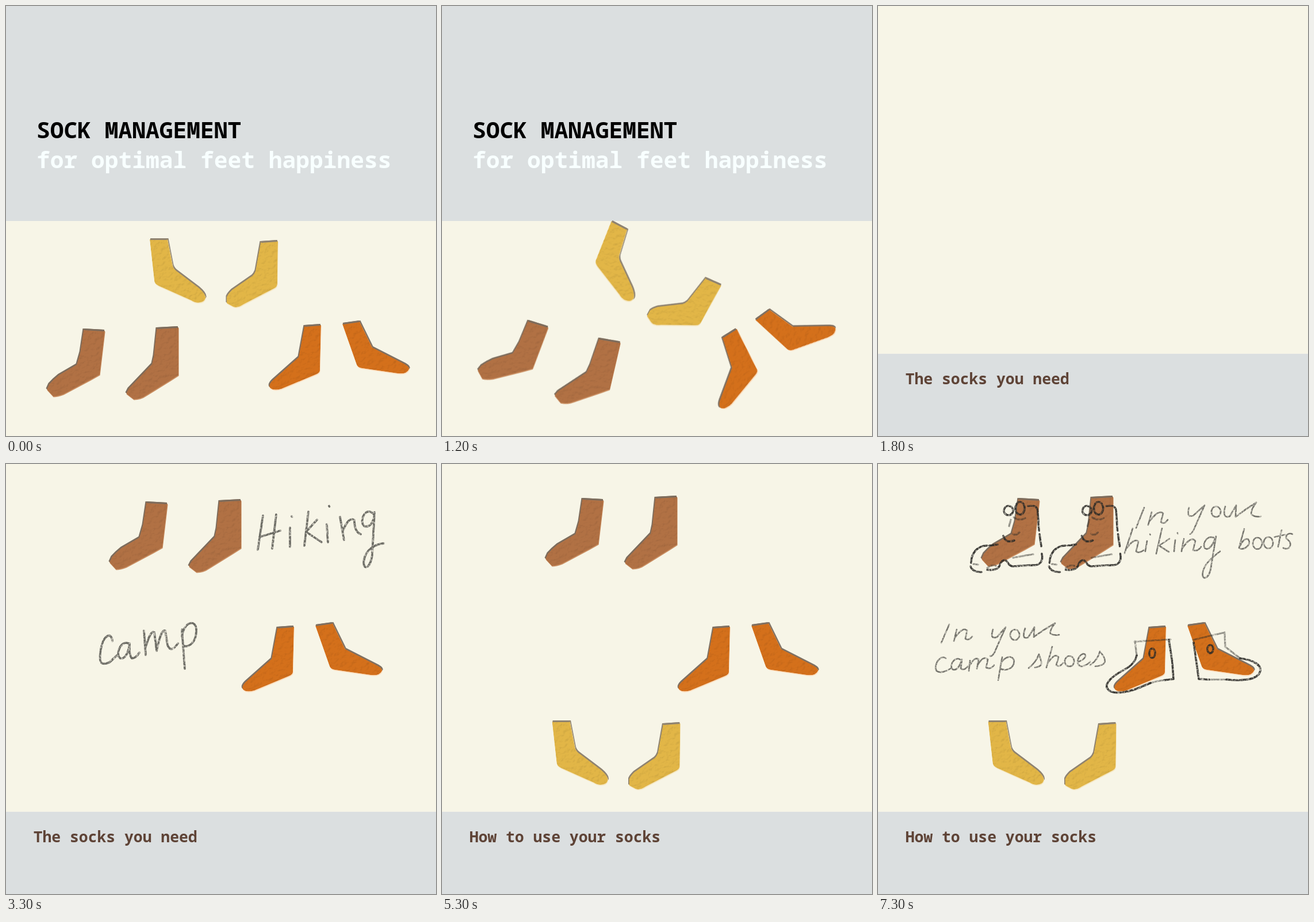
These frames come from a looping animation (748x748 px, 8 s). An HTML page:

```html
<!DOCTYPE html>
<html lang="en">
<head>
<meta charset="utf-8">
<title>Sock management</title>
<style>
html, body { margin: 0; width: 100%; height: 100%; overflow: hidden; background: #f7f5e7; }
svg { display: block; width: 100%; height: 100%; }
text { font-family: "Noto Sans Mono", "DejaVu Sans Mono", monospace; font-weight: 600; white-space: pre; }
.title { font-size: 39.6px; }
.caption { font-size: 26.4px; fill: #5e4336; }
.pencil { fill: none; stroke: #2c2b28; stroke-linecap: round; stroke-linejoin: round; filter: url(#pencil); }
.word { stroke-width: 3.8; opacity: .68; }
.note { stroke-width: 2.7; opacity: .64; }
.shoe { stroke-width: 3.6; opacity: .92; }
.faint { stroke-width: 3.2; opacity: .5; }
</style>
</head>
<body>
<svg id="stage" viewBox="0 0 748 748" xmlns="http://www.w3.org/2000/svg">
  <defs>
    <filter id="paper" color-interpolation-filters="sRGB">
      <feTurbulence type="fractalNoise" baseFrequency=".12" numOctaves="3" seed="4"/>
      <feDiffuseLighting surfaceScale=".45" diffuseConstant="1.15" lighting-color="#fff" result="light">
        <feDistantLight azimuth="235" elevation="60"/>
      </feDiffuseLighting>
      <feComposite in="SourceGraphic" in2="light" operator="arithmetic" k1="1"/>
      <feComposite in2="SourceGraphic" operator="in"/>
    </filter>
    <filter id="pencil" filterUnits="userSpaceOnUse" x="0" y="0" width="748" height="748">
      <feTurbulence type="fractalNoise" baseFrequency=".3" numOctaves="2" seed="7"/>
      <feColorMatrix values="0 0 0 0 0  0 0 0 0 0  0 0 0 0 0  0 0 0 2 -.15"/>
      <feComposite in="SourceGraphic" operator="in"/>
    </filter>
    <filter id="soft"><feGaussianBlur stdDeviation=".6"/></filter>
  </defs>
  <rect width="748" height="748" fill="#f7f5e7"/>
  <rect id="panel" width="748" fill="#dbdfe0"/>
  <g id="titles">
    <text class="title" x="53" y="230">SOCK MANAGEMENT</text>
    <text class="title" x="53" y="282" fill="#f8ffff">for optimal feet happiness</text>
  </g>
  <text id="caption" class="caption" x="47.7" y="658"></text>
  <g id="socks"></g>
  <g id="drawings"></g>
</svg>
<script>
const NS = "http://www.w3.org/2000/svg";
const $ = id => document.getElementById(id);

function add(parent, name, attrs) {
  const el = document.createElementNS(NS, name);
  for (const key in attrs) el.setAttribute(key, attrs[key]);
  return parent.appendChild(el);
}

const ring = (x, y, rx, ry) =>
  `M${x} ${y - ry}a${rx} ${ry} 0 1 0 .1 0Z`;

const colors = {
  brown: { fill: "#b17144", edge: "#7d6c5c", rim: "#c98d60" },
  orange: { fill: "#d4701b", edge: "#7f7062", rim: "#fbdcbc" },
  yellow: { fill: "#e2b647", edge: "#8f8371", rim: "#f5e6bf" }
};

// Outlines start at the left end of the cuff; poses are [angle, x, y] of that point.
const socks = [
  { kind: "brown", side: -1, cuff: [37, 2],
    d: "M0 0L37 2L28 78L12 87L-35 112Q-45 116 -53 116L-64 104L-60 95Q-53 87 -43 79L-12 61L-6 40Z",
    poses: [[0, 135, 563], [-14, 121.5, 578], [14, 149.5, 548]] },
  { kind: "brown", side: -1, cuff: [38, -2],
    d: "M0 0L38 -2L38 81L24 90L-18 116Q-28 123 -40 123L-53 113L-49 105L-8 62L-5 48Z",
    poses: [[0, 262, 561], [-13, 245, 541], [13, 273, 579]] },
  { kind: "orange", side: -1, cuff: [29, -2],
    d: "M0 0L29 -2L27 77Q27 81 20 84L-40 109Q-54 113 -60 107Q-63 102 -55 94L-10 54Z",
    poses: [[0, 519, 557], [29, 551, 535], [-28, 488, 577]] },
  { kind: "orange", side: 1, cuff: [30, -4],
    d: "M0 0L30 -4L52 41L103 67Q118 74 116 79Q112 88 96 86L34 77Q27 76 25 71Z",
    poses: [[0, 585, 553], [29, 611, 565], [-28, 545, 546]] },
  { kind: "yellow", side: 1, cuff: [31, 0],
    d: "M0 0L31 0L40 46Q42 52 48 56L85 84Q98 95 97 102Q95 110 84 110Q78 110 72 106L16 81Q8 77 8 72Z",
    poses: [[0, 250, 406], [-28, 258.8, 485.4], [28, 294.6, 374.3]] },
  { kind: "yellow", side: -1, cuff: [30, -2],
    d: "M0 0L30 -2L29 72Q29 77 24 80L-30 108Q-40 115 -48 112L-59 106L-59 95Q-57 90 -50 83L-14 58Q-11 55 -9 50Z",
    poses: [[0, 443, 411], [-28, 428, 395], [28, 458.5, 473.5]] }
];

for (const sock of socks) {
  const { fill, edge, rim } = colors[sock.kind];
  const { d } = sock;
  sock.el = add($("socks"), "g", {});
  add(sock.el, "path", { d, fill: edge, filter: "url(#soft)", transform: `translate(${1.5 * sock.side} -2)` });
  add(sock.el, "path", { d, fill: rim, filter: "url(#soft)", transform: "translate(.6 1.6)" });
  add(sock.el, "path", { d, fill, filter: "url(#paper)" });
  add(sock.el, "path", { d: `M1 -.5L${sock.cuff[0] - 1} ${sock.cuff[1] - .5}`, stroke: edge, "stroke-width": 3 });
}

const words = {
  hiking: ["word",
    "M447 90L438 149M470 88L463 147M441 127L477 116M494 111L494 144M497 91l.5 1",
    "M526 83L519 142M541 97L522 118L549 136M558 105L560 136M562 73l.5 1",
    "M581 92L588 132M586 116Q597 90 606 98Q606 118 617 122",
    "M640 88C627 72 613 98 623 108C634 112 641 98 641 84L637 158C633 186 619 184 623 166C626 150 640 140 657 138"],
  camp: ["word",
    "M185 308C184 292 170 296 165 322C160 350 168 350 180 345L193 333",
    "M213 312C200 306 189 332 199 338C208 340 214 325 215 312Q214 334 219 338Q226 338 232 328",
    "M240 290L243 332M243 318Q252 288 258 293L262 325Q270 286 277 290L281 315Q287 330 299 312",
    "M306 288L311 356M306 300C310 272 332 270 331 290C331 310 318 320 308 316"],
  sleep: ["word",
    "M478 478C468 464 446 474 452 492C458 506 478 506 474 524C468 540 448 536 446 522",
    "M498 508C516 490 520 462 510 464C500 470 500 510 506 528C512 536 520 526 524 518",
    "M524 518C540 512 546 494 536 494C524 496 522 528 538 530Q552 528 562 518",
    "M562 518C578 512 584 494 574 494C562 496 560 528 576 530Q590 526 596 512",
    "M602 492L607 556M604 505C612 480 640 484 636 506C632 524 616 524 608 518M630 522Q652 522 667 504"],
  inBoots: ["note",
    "M463 76L449 111M476 84L470 106M472 100Q489 78 496 86L492 101Q498 106 504 97",
    "M541 76Q536 94 548 90L568 72M568 72L552 108Q546 122 543 122",
    ring(588, 83, 8, 9) + "M604 74Q598 96 612 91L623 72L622 92Q640 78 658 67Q647 82 650 88Q656 93 666 91",
    "M443 112L429 155M433 146Q446 128 453 135L449 152Q454 156 462 150M468 134L465 152M473 122l.5 1",
    "M494 112L484 156M507 130L489 142L506 153M517 132L515 152M521 120l.5 1",
    "M532 130L528 152M530 146Q545 124 552 134L548 150Q556 153 562 144",
    "M584 128C570 122 561 146 572 148C582 146 586 130 588 126L580 175C577 202 562 204 565 188C568 172 585 160 595 152",
    "M637 113L628 146C636 152 651 140 644 131C639 128 632 136 630 142" + ring(660, 138, 8, 10) + ring(679, 137, 8, 10),
    "M702 115L696 144M690 127L708 123M721 122C712 118 706 128 713 132C722 138 716 152 705 146"],
  inShoes: ["note",
    "M124 279L110 311M137 288L132 308M134 302Q148 282 155 290L152 304Q158 308 164 300",
    "M200 288Q194 306 207 301L222 284M222 284L206 320Q200 336 195 334",
    ring(238, 297, 8, 9) + "M256 286Q249 306 261 302L272 284L271 301Q288 288 308 277Q298 290 300 295Q306 299 315 297",
    "M118 338C107 330 96 352 102 360C108 365 120 360 126 356",
    "M143 340C130 334 122 356 132 358C140 358 144 346 146 340L144 356Q150 360 156 352",
    "M160 342L158 360M159 352Q168 334 175 340L172 356M173 350Q184 332 191 340L188 354Q196 358 202 350",
    "M216 336L209 376M214 346C224 330 240 334 236 348C232 358 220 360 213 356",
    "M262 355Q274 346 280 331C284 345 290 351 273 354M303 318L293 354M297 344Q308 328 314 336L310 350Q316 354 322 346",
    ring(333, 343, 8, 9) + "M348 344C362 340 364 330 357 330C346 334 343 352 355 352Q364 350 369 344",
    "M369 350Q383 340 386 326C396 338 402 350 378 352"]
};

const boot = [
  ring(227, 81, 8, 8) + ring(247, 77, 8, 11),
  "M261 73Q278 70 278 84L280 116M281 122L284 143",
  "M285 156C288 170 281 177 268 176L234 178Q229 177 226 172C221 163 214 168 211 178Q206 186 190 184",
  "M162 172C162 156 172 142 190 142M194 142L208 140M161 178Q164 188 180 188",
  "M218 125Q222 139 237 133"
];
const bootFaint = "M231 97L228 108M236 93Q248 100 256 94M234 121Q240 126 246 119M166 174L174 175M190 181Q196 175 205 177M235 163L270 157";

const campShoes = [
  "M450 333Q447 348 428 358C400 373 392 386 402 394C414 402 440 396 462 386L474 381M498 376L514 374L512 345L506 306",
  "M549 310L558 374L576 375M606 375C640 378 662 374 665 360C667 350 654 341 630 338",
  ring(477, 329, 5, 8) + ring(578, 322, 5, 7)
];
const campFaint = "M447 308L450 333M446 309L509 305M474 381Q486 377 498 376M548 306L603 293L604 318L630 338M576 375L606 375";

function sketch(cls, paths, parent = $("drawings")) {
  const g = add(parent, "g", { class: "pencil " + cls });
  for (const d of paths) add(g, "path", { d });
  return g;
}

const art = {};
for (const name in words) art[name] = sketch(words[name][0], words[name].slice(1));

art.boots = add($("drawings"), "g", {});
for (const x of [0, 136.5]) {
  const g = add(art.boots, "g", { transform: `translate(${x})` });
  sketch("shoe", boot, g);
  sketch("faint", [bootFaint], g);
}
art.shoes = add($("drawings"), "g", {});
sketch("shoe", campShoes, art.shoes);
sketch("faint", [campFaint], art.shoes);

const LOOP = 8000, INTRO = 1800, USE = 5300;
const shelf = {
  brown: { from: 2300, x: 109, y: -496 },
  orange: { from: 3300, x: -47, y: -272 },
  yellow: { from: 4300, x: -58.5, y: 42 }
};
const shown = {
  hiking: [2300, USE], camp: [3300, USE], sleep: [4300, USE],
  inBoots: [6300, LOOP], boots: [6300, LOOP],
  inShoes: [7300, LOOP], shoes: [7300, LOOP]
};

const show = (el, on) => { el.style.display = on ? "" : "none"; };

function draw(t) {
  const intro = t < INTRO;
  const pose = intro ? [0, 1, 2, 1][Math.floor(t / 200) % 4] : 0;
  show($("titles"), intro);
  $("panel").setAttribute("y", intro ? 0 : 605);
  $("panel").setAttribute("height", intro ? 374 : 143);
  $("caption").textContent = intro ? "" : t < USE ? "The socks you need" : "How to use your socks";

  for (const sock of socks) {
    const place = shelf[sock.kind];
    let [angle, x, y] = sock.poses[pose];
    if (!intro) {
      x += place.x;
      y += place.y;
      if (sock.kind === "brown" && t >= USE) y -= 6;
    }
    show(sock.el, intro || t >= place.from);
    sock.el.setAttribute("transform", `translate(${x} ${y}) rotate(${angle})`);
  }
  for (const name in shown) show(art[name], t >= shown[name][0] && t < shown[name][1]);
}

// Every change falls on a 100 ms step, so redraw only when the step changes.
const start = performance.now();
let last = -1;
function tick() {
  const step = Math.floor((performance.now() - start) % LOOP / 100);
  if (step !== last) draw(step * 100);
  last = step;
  requestAnimationFrame(tick);
}
tick();
</script>
</body>
</html>
```
